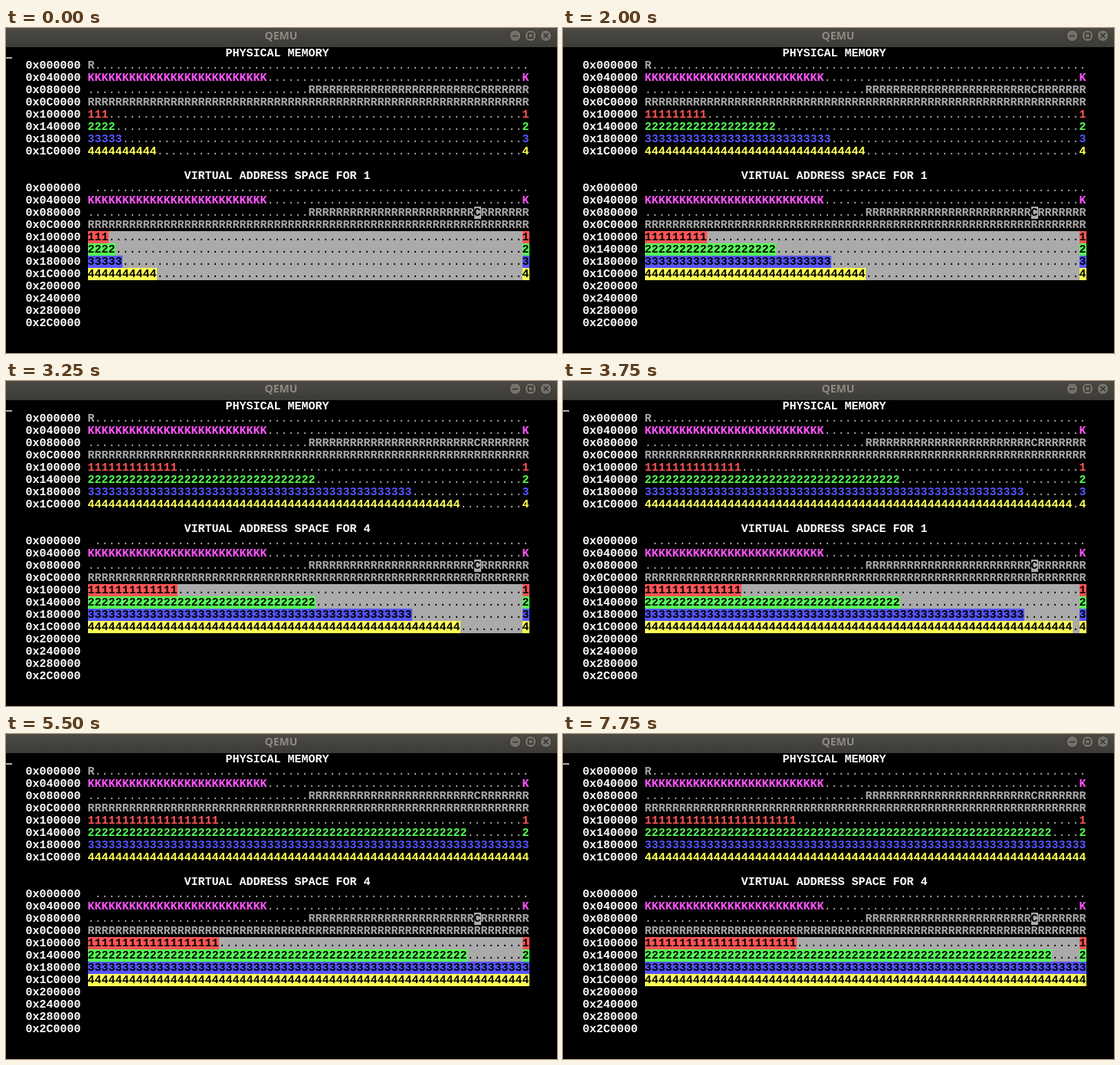
An HTML page that plays this animation: 719 px wide and 424 px high, repeating every 8000 ms.

```html
<!DOCTYPE html>
<html lang="en">
<head>
<meta charset="utf-8">
<title>Memory viewer</title>
<style>
html, body { margin: 0; width: 100%; height: 100%; overflow: hidden; background: #000; }
svg { display: block; }
.cell { font: bold 15px "Liberation Mono", monospace; }
.dot { font-weight: normal; }
.title { font: 600 14px "Noto Sans", "Open Sans", sans-serif; fill: #8d8a83; text-anchor: middle; }
.btn circle { fill: #74716a; stroke: #32312d; }
.btn path { fill: none; stroke: #32312d; stroke-width: 1.4; }
</style>
</head>
<body>
<svg id="stage" width="719" height="424" viewBox="0 0 719 424">
  <defs>
    <linearGradient id="bar" x1="0" y1="0" x2="0" y2="1">
      <stop offset="0" stop-color="#4b4a45"/>
      <stop offset="1" stop-color="#3c3b37"/>
    </linearGradient>
  </defs>
  <rect width="719" height="424"/>
  <rect width="719" height="25" fill="url(#bar)"/>
  <text class="title" x="359" y="15">QEMU</text>
  <g class="btn" transform="translate(664.5 10)"><circle r="7.5"/><path d="M-3.5 0.5h7"/></g>
  <g class="btn" transform="translate(684.5 10)"><circle r="7.5"/><path d="M-3 -3h6v6h-6z"/></g>
  <g class="btn" transform="translate(704.5 10)"><circle r="7.5"/><path d="M-3 -3l6 6M3 -3l-6 6"/></g>
</svg>
<script>
const stage = document.getElementById("stage");
const CW = 9, CH = 16, LEFT = -1, TOP = 25;
const FIRST = 12, LAST = 63;
const GRAY = "#aaa", WHITE = "#fff", PINK = "#f5f";
const LOOP = 8000, STEP = 250;

const colX = c => LEFT + c * CW;
const rowY = r => TOP + r * CH;

function add(name, attrs) {
  const el = document.createElementNS("http://www.w3.org/2000/svg", name);
  for (const k in attrs) el.setAttribute(k, attrs[k]);
  return stage.appendChild(el);
}

function print(col, row, str, fill, cls = "cell") {
  const el = add("text", { class: cls, x: colX(col) - 0.5, y: rowY(row) + 12, fill });
  el.textContent = str;
  return el;
}

const dots = (col, row, n, fill = GRAY) => print(col, row, ".".repeat(n), fill, "cell dot");

const box = (col, row, n, fill) =>
  add("rect", { x: colX(col), y: rowY(row), width: n * CW, height: CH, fill });

// Pages used by each process, as [step, count] points
const procs = [
  { id: "1", color: "#f55", keys: [[0, 3], [4, 7], [8, 9], [10, 11], [15, 14], [22, 19], [30, 21], [31, 22]] },
  { id: "2", color: "#5f5", keys: [[0, 4], [4, 13], [8, 19], [10, 26], [15, 37], [22, 55], [25, 56], [30, 59]] },
  { id: "3", color: "#55f", keys: [[0, 5], [4, 14], [8, 27], [10, 36], [15, 55], [17, 63]] },
  { id: "4", color: "#ff5", keys: [[0, 10], [4, 22], [8, 32], [10, 41], [15, 62], [16, 63]] }
];

function pages(keys, step) {
  const i = keys.findIndex(k => k[0] > step);
  if (i < 0) return keys[keys.length - 1][1];
  const [s0, n0] = keys[i - 1], [s1, n1] = keys[i];
  return Math.round(n0 + (n1 - n0) * (step - s0) / (s1 - s0));
}

function kernelRows(row, virtual) {
  if (!virtual) print(FIRST, row, "R", GRAY);
  dots(FIRST + 1, row, LAST);

  print(FIRST, row + 1, "K".repeat(26), PINK);
  dots(FIRST + 26, row + 1, 37);
  print(FIRST + LAST, row + 1, "K", PINK);

  dots(FIRST, row + 2, 32);
  print(FIRST + 32, row + 2, "R".repeat(24), GRAY);
  if (virtual) box(FIRST + 56, row + 2, 1, GRAY);
  print(FIRST + 56, row + 2, "C", virtual ? "#000" : GRAY);
  print(FIRST + 57, row + 2, "R".repeat(7), GRAY);

  print(FIRST, row + 3, "R".repeat(64), GRAY);
}

function processRow(row, proc, virtual) {
  const ink = virtual ? "#000" : proc.color;
  let bar;
  if (virtual) {
    box(FIRST, row, LAST, GRAY);
    bar = box(FIRST, row, 0, proc.color);
    box(FIRST + LAST, row, 1, proc.color);
  }
  const used = print(FIRST, row, "", ink);
  const free = dots(FIRST, row, 0, virtual ? "#000" : GRAY);
  print(FIRST + LAST, row, proc.id, ink);

  return step => {
    const n = pages(proc.keys, step);
    used.textContent = proc.id.repeat(n);
    free.textContent = ".".repeat(LAST - n);
    free.setAttribute("x", colX(FIRST + n) - 0.5);
    if (bar) bar.setAttribute("width", n * CW);
  };
}

function memoryMap(row, labels, virtual) {
  for (let i = 0; i < labels; i++) {
    const addr = (i * 0x40000).toString(16).toUpperCase().padStart(6, "0");
    print(3, row + i, "0x" + addr, WHITE);
  }
  kernelRows(row, virtual);
  return procs.map((p, i) => processRow(row + 4 + i, p, virtual));
}

print(32, 0, "PHYSICAL MEMORY", WHITE);
const heading = print(26, 10, "", WHITE);
const cursor = add("rect", { x: 0, y: rowY(0) + 13, width: 8, height: 2, fill: GRAY });
const updates = [...memoryMap(1, 8, false), ...memoryMap(11, 12, true)];

let shown = -1;
function draw(ms) {
  const step = Math.floor(ms % LOOP / STEP);
  if (step === shown) return;
  shown = step;
  const t = step * STEP;
  const active = Math.floor((t + 370) / 510) % 4 + 1;
  const blink = Math.floor((t + 70) / 272) % 2;
  heading.textContent = "VIRTUAL ADDRESS SPACE FOR " + active;
  cursor.setAttribute("visibility", blink ? "hidden" : "visible");
  updates.forEach(update => update(step));
}

const start = performance.now();
function tick() {
  draw(performance.now() - start);
  requestAnimationFrame(tick);
}
tick();
</script>
</body>
</html>
```
